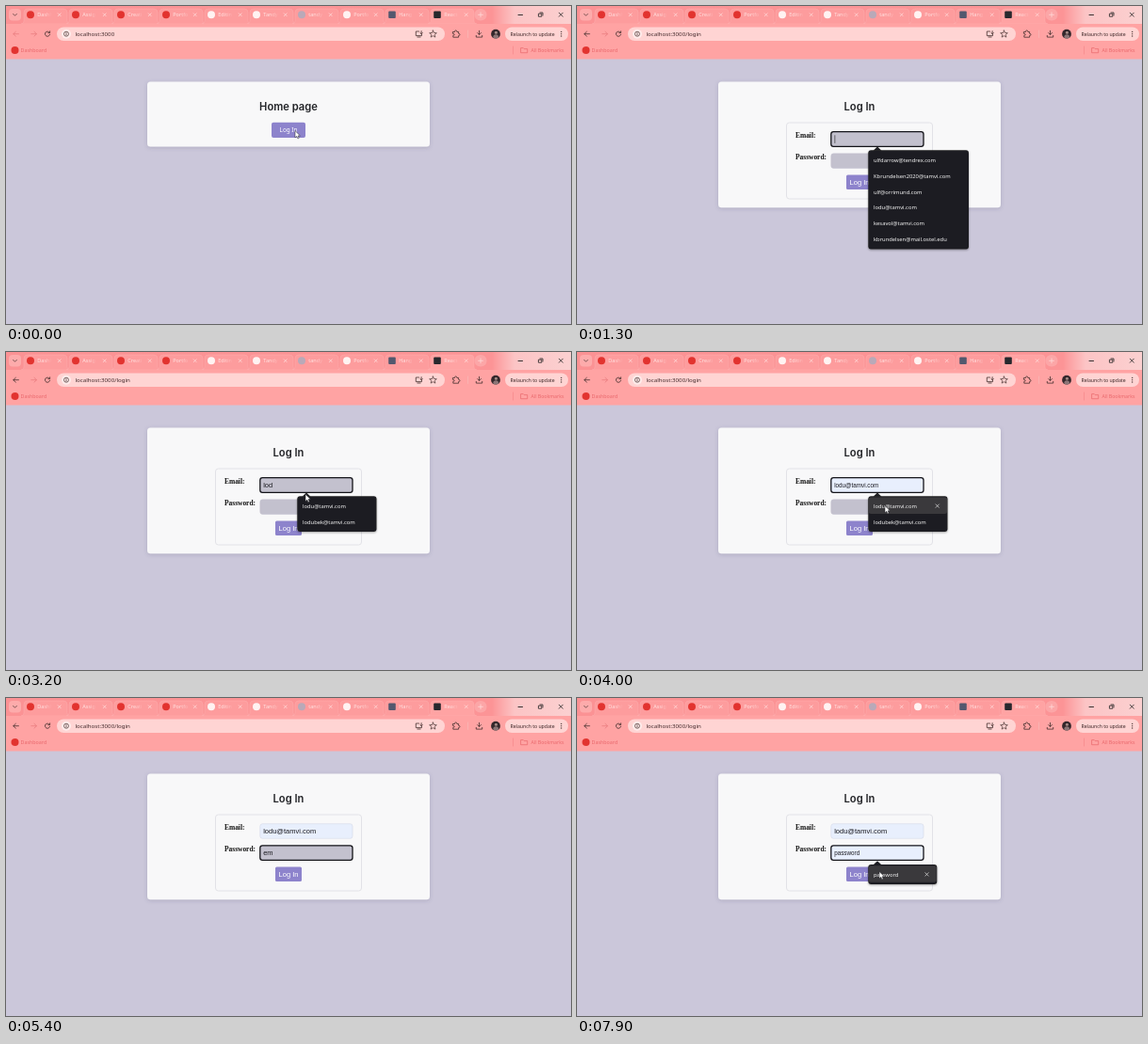
Write an HTML page that moves like this. It is 600x338 px and loops after 8 s.

```html
<!DOCTYPE html>
<html lang="en">
<head>
<meta charset="utf-8">
<title>Log In</title>
<style>
html, body { margin: 0; width: 100%; height: 100%; overflow: hidden; background: #cbc7da; }
svg { display: block; width: 100vw; height: 100vh; }
.ui { font-family: "Noto Sans", "Open Sans", sans-serif; }
.head { font-family: Inter, sans-serif; font-weight: 600; }
.form { font-family: "Liberation Sans", Arial, sans-serif; }
.label { font-family: "Liberation Serif", "Times New Roman", serif; font-weight: 700; }
.line { fill: none; stroke-linecap: round; stroke-linejoin: round; }
</style>
</head>
<body>
<svg id="stage" viewBox="0 0 600 338">
  <defs>
    <linearGradient id="strip">
      <stop offset="0" stop-color="#fb9294"/><stop offset=".86" stop-color="#fc9496"/>
      <stop offset=".9" stop-color="#fcc4c5"/><stop offset="1" stop-color="#fbd0d0"/>
    </linearGradient>
    <linearGradient id="fade">
      <stop offset=".45" stop-color="#ffe3e2"/><stop offset="1" stop-color="#ffe3e2" stop-opacity=".15"/>
    </linearGradient>
    <filter id="soft" x="-10%" y="-20%" width="120%" height="150%">
      <feDropShadow dx="0" dy="1" stdDeviation="2" flood-color="#453f66" flood-opacity=".22"/>
    </filter>
    <filter id="deep" x="-10%" y="-20%" width="120%" height="150%">
      <feDropShadow dx="0" dy="1" stdDeviation="1.2" flood-opacity=".35"/>
    </filter>
  </defs>
</svg>
<script>
const LOOP = 8000;
const INK = '#44302f', PALE = '#ffdedd', ROSE = '#e9686c', RED = '#e2332f';
const stage = document.getElementById('stage');

function add(parent, tag, attrs, text) {
  const node = document.createElementNS('http://www.w3.org/2000/svg', tag);
  for (const key in attrs) node.setAttribute(key, attrs[key]);
  if (text !== undefined) node.textContent = text;
  return parent.appendChild(node);
}
const group = (parent = stage) => add(parent, 'g', {});
const rect = (p, x, y, width, height, fill, rx = 0, more = {}) =>
  add(p, 'rect', { x, y, width, height, fill, rx, ...more });
const dot = (p, cx, cy, r, fill) => add(p, 'circle', { cx, cy, r, fill });
const line = (p, d, stroke, width = 0.8) =>
  add(p, 'path', { d, stroke, 'stroke-width': width, class: 'line' });
const label = (p, x, y, size, text, fill, cls = 'ui', more = {}) =>
  add(p, 'text', { x, y, 'font-size': size, fill, class: cls, ...more }, text);
const show = (node, on) => node.setAttribute('display', on ? 'inline' : 'none');
const cross = (p, x, y, r, color, width) =>
  line(p, `M${x - r} ${y - r}l${2 * r} ${2 * r}m0 ${-2 * r}l${-2 * r} ${2 * r}`, color, width);
const middle = { 'text-anchor': 'middle' };

// Value of the last [time, value] step already reached
function stepAt(steps, t) {
  let value = steps[0][1];
  for (const [at, v] of steps) if (t >= at) value = v;
  return value;
}
const ease = (t, from, to) => {
  const k = Math.min(1, Math.max(0, (t - from) / (to - from)));
  return k * k * (3 - 2 * k);
};

function drawTabs() {
  rect(stage, 0, 0, 600, 20, 'url(#strip)');
  rect(stage, 3, 3, 13, 12.5, '#fdabab', 4);
  line(stage, 'M7.6 8.4l1.9 1.9 1.9-1.9', INK, 0.7);
  const titles = ['Dashl', 'Assig', 'Creati', 'Portfo', 'Editin', 'Tandy', 'tandy', 'Portfo', 'Hang', 'React'];
  const icons = [RED, RED, RED, RED, '#fff3f2', '#fff3f2', '#b9a9b8', '#fff3f2', '#53586e', '#27282d'];
  titles.forEach((title, i) => {
    const x = 18 + 48 * i, active = i === 9;
    add(stage, 'path', {
      d: `M${x - 2} 19q3 0 3-3v-9q0-4 4-4h38q4 0 4 4v9q0 3 3 3z`,
      fill: active ? '#ffa3a3' : '#fd9c9d', stroke: '#fdb4b4', 'stroke-width': 0.4
    });
    if (i < 8) dot(stage, x + 8, 9.3, 4, icons[i]);
    else rect(stage, x + 4.2, 5.5, 7.6, 7.6, icons[i], 1);
    label(stage, x + 15.3, 11.4, 5.5, title, 'url(#fade)');
    cross(stage, x + 38.7, 9.3, 1.5, PALE, 0.7);
  });
  rect(stage, 497.5, 3, 13, 12.5, '#fca6a7', 6);
  line(stage, 'M501.6 9.3h4.8m-2.4-2.4v4.8', PALE, 0.7);
  line(stage, 'M544 9.5h4.5', '#222', 0.9);
  line(stage, 'M565.8 8.2h3v3h-3zM567 7h3v3', '#222', 0.8);
  cross(stage, 589.3, 9.2, 2, '#222', 0.8);
}

function drawToolbar() {
  rect(stage, 0, 19, 600, 38, '#ffa3a3');
  line(stage, 'M32.4 29.7h-5.6m3.2-2.4l2.5 2.4-2.5 2.4', '#e97d7f');
  line(stage, 'M46.2 28.2a2.6 2.6 0 1 0 .4 2.1M46.6 26.8v1.8h-1.8', INK);
  rect(stage, 54, 22.5, 412, 14.5, '#ffd4d3', 7.2);
  dot(stage, 64, 29.7, 5, '#ffebea');
  add(stage, 'circle', { cx: 64, cy: 29.7, r: 2.5, fill: 'none', stroke: INK, 'stroke-width': 0.7 });
  line(stage, 'M64 29.4v1.5m0-2.7v.1', INK, 0.7);
  line(stage, 'M438.5 27h-3.2v4.6h6.2v-1.6m-4.6 3h3.2m1-6.4v3m-1.2-1.1l1.2 1.2 1.2-1.2', INK, 0.8);
  line(stage, 'M453.5 26l1.1 2.5 2.7.2-2.1 1.8.7 2.6-2.4-1.4-2.4 1.4.7-2.6-2.1-1.8 2.7-.2z', INK, 0.7);
  line(stage, 'M474.8 27.5h1.7q0-1.6 1.2-1.6t1.2 1.6h1.7v1.8q1.4 0 1.4 1.1t-1.4 1.1v1.7h-5.8v-1.9q1.4 0 1.4-1t-1.4-1z', INK, 0.8);
  line(stage, 'M490.5 26v7.5', '#f6bcbb', 0.6);
  line(stage, 'M502.5 26.3v4m-1.9-1.8l1.9 1.9 1.9-1.9m-5.1 2.9v1.7h6.4v-1.7', INK, 0.8);
  dot(stage, 520, 29.7, 4.9, '#33272b');
  dot(stage, 520.4, 28.3, 1.5, '#a58b86');
  add(stage, 'path', { d: 'M517.2 33.4q.2-3.2 3-3.2t3 3.2q-3 2-6 0z', fill: '#8c7577' });
  rect(stage, 530, 22.5, 67, 14.5, '#ffd4d3', 7.2);
  label(stage, 535.5, 31.6, 5.15, 'Relaunch to update', '#3b2526');
  for (const y of [27.4, 29.7, 32]) dot(stage, 589.7, y, 0.65, INK);

  dot(stage, 9.5, 47, 4, RED);
  label(stage, 15.5, 48.9, 5.35, 'Dashboard', ROSE);
  line(stage, 'M538.5 43v8', '#f38486', 0.6);
  line(stage, 'M547 44.6h2.3l.9 1h3.5v4.1h-6.7z', ROSE, 0.7);
  label(stage, 557.5, 48.9, 5.2, 'All Bookmarks', ROSE);
}

drawTabs();
drawToolbar();
const back = line(stage, 'M13.4 29.7h-5.6m2.5-2.4l-2.5 2.4 2.5 2.4', INK);
const url = label(stage, 73.5, 31.8, 6.15, '', '#40292b');

rect(stage, 0, 56.5, 600, 281.5, '#cbc7da');
const card = rect(stage, 150, 80.5, 300, 69, '#f8f8f9', 3.5, { filter: 'url(#soft)' });
const heading = label(stage, 300, 111.2, 11.2, '', '#222327', 'head', middle);

const home = group();
const homeButton = rect(home, 282, 123.7, 36, 16.4, '#8d83cc', 2);
label(home, 300, 134.2, 6.35, 'Log In', '#fff', 'ui', middle);

const login = group();
rect(login, 222.5, 124, 155, 81, 'none', 3, { stroke: '#dcdce2', 'stroke-width': 0.8 });
label(login, 232, 139.8, 7.43, 'Email:', '#111', 'label');
label(login, 232, 163.2, 7.43, 'Password:', '#111', 'label');
rect(login, 286, 179.5, 28, 15.6, '#8d83cc', 1.6);
label(login, 300, 190, 7.5, 'Log In', '#fff', 'form', middle);

function makeField(y) {
  const box = rect(login, 269.8, y, 98.2, 15.6, '#c3c1ce', 2.6);
  const text = label(login, 273.2, 0, 7.5, '', '#1d1d22', 'form');
  const caret = rect(login, 0, y + 3.6, 0.6, 8.6, '#222');
  return ({ value, preview, filled, focus, blink }) => {
    box.setAttribute('fill', preview || filled ? '#e8effd' : '#c3c1ce');
    box.setAttribute('stroke', focus ? '#15151a' : filled ? '#cfd3e2' : '#c3c1ce');
    box.setAttribute('stroke-width', focus ? 1.3 : 0.5);
    text.textContent = preview || value;
    text.setAttribute('font-size', preview ? 6.3 : 7.5);
    text.setAttribute('y', y + (preview ? 10.2 : 10.5));
    show(caret, blink);
    if (blink) caret.setAttribute('x', 273.6 + (value ? text.getComputedTextLength() : 0));
  };
}
const setEmail = makeField(133.7);
const setPassword = makeField(156.8);

const ROW = 16.9;
function makePopup(y, width, items) {
  const g = group(), h = items.length * ROW + 4;
  const shell = group(g);
  shell.setAttribute('filter', 'url(#deep)');
  add(shell, 'path', { d: `M314.5 ${y + 0.5}l4.5-4.2 4.5 4.2z`, fill: '#1f1f20' });
  rect(shell, 309.3, y, width, h, '#1f1f20', 3);
  const hover = group(g);
  rect(hover, 309.8, y + 1.2, width - 1, ROW + 0.6, '#3a393c', 2.5);
  cross(hover, 309.3 + width - 10.8, y + 10.4, 1.7, '#e6e6e6', 0.7);
  items.forEach((item, i) =>
    label(g, 315, y + 12.5 + i * ROW, 5.8, item, '#f4f4f4', 'ui', { 'font-weight': 500 }));
  return (open, hot) => { show(g, open); show(hover, hot); };
}
const EMAIL = 'lodu@tamvi.com';
const emailAll = makePopup(153.2, 106.7, [
  'ulfdarrow@tendrex.com', 'Kbrundelsen2020@tamvi.com', 'ulf@orrimund.com',
  EMAIL, 'kesavol@tamvi.com', 'kbrundelsen@mail.ostel.edu'
]);
const emailMatch = makePopup(153.2, 84.2, [EMAIL, 'lodubek@tamvi.com']);
const passAll = makePopup(177, 73, ['password', 'pa']);
const passMatch = makePopup(177, 73, ['password']);

const arrow = add(stage, 'path', {
  d: 'M0 0v7.4l1.8-1.6 1.1 2.6 1.3-.6-1.1-2.5h2.3z',
  fill: '#fff', stroke: '#1c1c22', 'stroke-width': 0.5, 'stroke-linejoin': 'round'
});
const beam = line(stage, 'M-1.5-4h3M0-4v8m-1.5 0h3', '#222', 0.6);

const emailTyped = [[0, ''], [1700, 'l'], [1900, 'lo'], [2100, 'lod'], [4200, EMAIL]];
const passTyped = [
  [0, ''], [5100, 'e'], [5300, 'em'], [5500, 'emp'], [5600, 'empl'], [5900, 'emp'], [6000, 'em'],
  [6200, 'e'], [6300, ''], [6400, 'p'], [6500, 'pa'], [6700, 'pas']
];
const caretOn = [
  [0, false], [1200, true], [2200, false], [2700, true], [3200, false], [4400, true], [4900, false],
  [5100, true], [5400, false], [5500, true], [7200, false]
];
const popups = [
  [0, ''], [1200, 'emailAll'], [1700, 'emailMatch'], [4200, ''], [4400, 'passAll'],
  [5100, ''], [6500, 'passAll'], [6800, 'passMatch']
];
const pointers = [
  [0, 'arrow'], [800, 'beam'], [1200, ''], [3000, 'arrow'], [4300, 'beam'], [5100, ''], [7000, 'arrow']
];

function pointerAt(t) {
  if (t < 3000) return [307, 132.6];
  if (t < 7000) {
    const k = ease(t, 2900, 3500);
    return [309 + 18 * k, 139 + 24.5 * k];
  }
  const k = ease(t, 6900, 7500);
  return [327 - 6 * k, 167 + 17.5 * k];
}

function render(t) {
  const inLogin = t >= 200;
  show(home, !inLogin);
  show(login, inLogin);
  homeButton.setAttribute('fill', t >= 100 ? '#776db9' : '#8d83cc');
  card.setAttribute('height', inLogin ? 133.7 : 69);
  heading.textContent = inLogin ? 'Log In' : 'Home page';
  url.textContent = 'localhost:3000' + (inLogin ? '/login' : '');
  back.setAttribute('stroke', inLogin ? INK : '#e97d7f');

  const [x, y] = pointerAt(t), pointer = stepAt(pointers, t), open = stepAt(popups, t);
  const emailHot = open === 'emailMatch' && pointer === 'arrow' && y >= 154;
  const passHot = open === 'passMatch' && pointer === 'arrow' && y >= 178;
  const blink = stepAt(caretOn, t);
  const onEmail = t >= 1200 && t < 4400, onPass = t >= 4400;

  setEmail({
    value: stepAt(emailTyped, t), preview: emailHot && EMAIL, filled: t >= 4200,
    focus: onEmail, blink: onEmail && blink && !emailHot
  });
  setPassword({
    value: stepAt(passTyped, t), preview: passHot && 'password', filled: false,
    focus: onPass, blink: onPass && blink && !passHot
  });
  emailAll(open === 'emailAll', false);
  emailMatch(open === 'emailMatch', emailHot);
  passAll(open === 'passAll', false);
  passMatch(open === 'passMatch', passHot);

  show(arrow, pointer === 'arrow');
  show(beam, pointer === 'beam');
  arrow.setAttribute('transform', `translate(${x} ${y})`);
  beam.setAttribute('transform', `translate(${x + 2} ${y + 4})`);
}

const start = performance.now();
function tick() {
  const t = (performance.now() - start) % LOOP;
  render(Math.floor(t / 100) * 100);
  requestAnimationFrame(tick);
}
tick();
</script>
</body>
</html>
```
